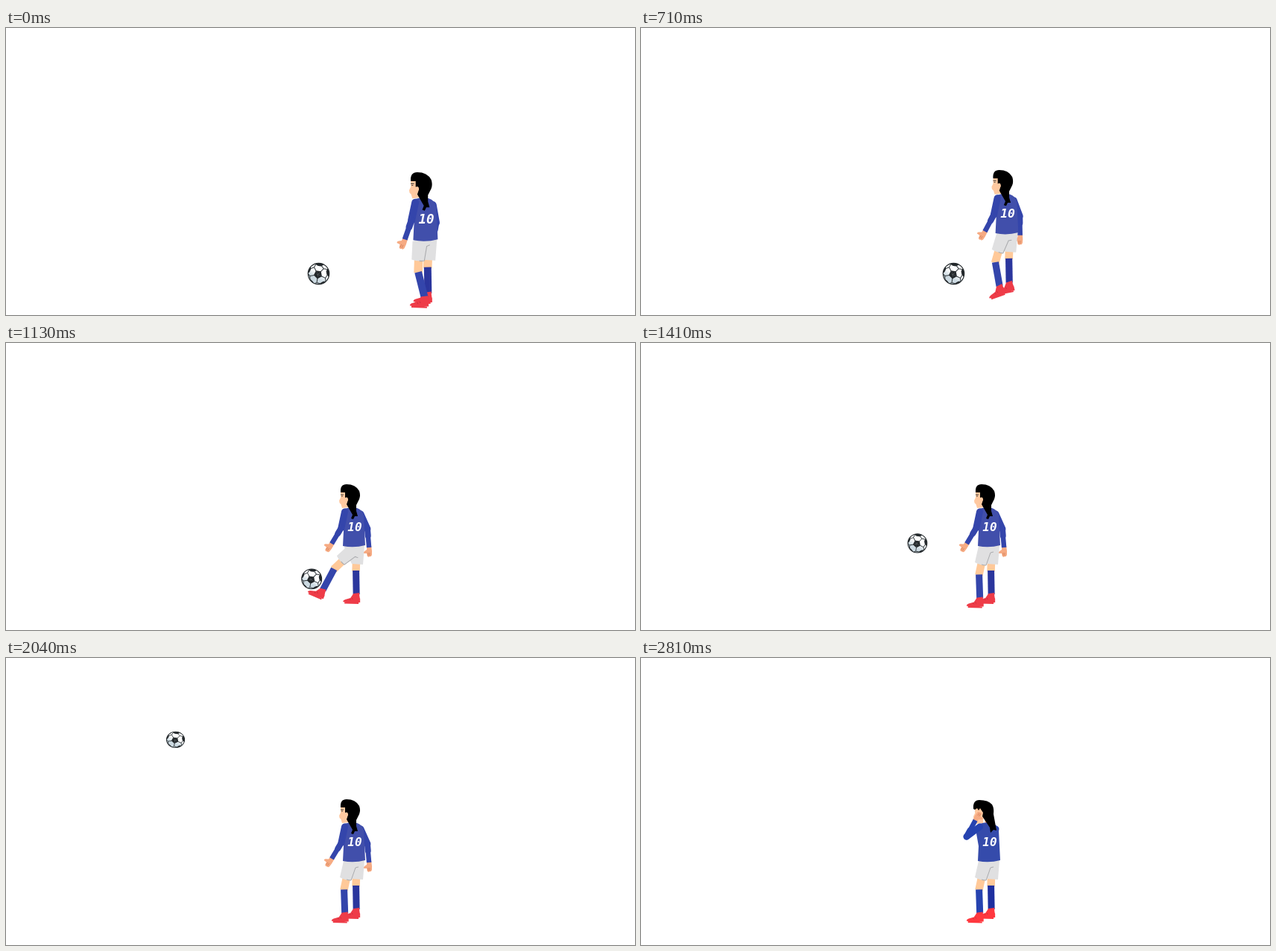
Recreate the animation shown at these times as an HTML page with a canvas. Size 844 by 386 pixels, loop 2.88 s.

```html
<!DOCTYPE html>
<html lang="en">
<head>
<meta charset="utf-8">
<title>Penalty kick</title>
<style>
html, body { margin: 0; width: 100%; height: 100%; overflow: hidden; background: #fff; }
canvas { display: block; }
</style>
</head>
<body>
<canvas id="stage" width="844" height="386"></canvas>
<script>
const ctx = document.getElementById('stage').getContext('2d');
const LOOP = 2880, HOLD = 500, STEP = 70;
const KICK = 8, PEAK = 24, GONE = 32; // in steps

const rad = deg => deg * Math.PI / 180;
const ramp = (n, from, to) => Math.min(1, Math.max(0, (n - from) / (to - from)));

function shape(d, fill, line, width = 1) {
  const p = new Path2D(d);
  if (fill) { ctx.fillStyle = fill; ctx.fill(p); }
  if (line) { ctx.strokeStyle = line; ctx.lineWidth = width; ctx.stroke(p); }
}

function at(x, y, deg, draw) {
  ctx.save();
  ctx.translate(x, y);
  ctx.rotate(rad(deg));
  draw();
  ctx.restore();
}

// End of a limb part; angles run from straight down towards the left
const reach = ([x, y], deg, len) => [x - Math.sin(rad(deg)) * len, y + Math.cos(rad(deg)) * len];

function bar(a, b, width, color, cap = 'butt') {
  ctx.lineCap = cap;
  ctx.lineWidth = width;
  ctx.strokeStyle = color;
  ctx.beginPath();
  ctx.moveTo(...a);
  ctx.lineTo(...b);
  ctx.stroke();
}

function arm(shoulder, upper, fore, color) {
  const elbow = reach(shoulder, upper, 22), wrist = reach(elbow, fore, 25);
  at(...wrist, fore + 6, () => {
    shape('M-3-2H3L4 5 4 10Q3 13 1 12L0 13-2 12-3 8-7 8Q-8 6-6 5L-3 3Z', '#f6ab83');
    shape('M1 7V11M-1 7V11', null, '#c9744f', .6);
  });
  bar(shoulder, elbow, 9, color, 'round');
  bar(elbow, wrist, 6.5, color);
  bar(elbow, reach(elbow, fore, 9), 8, color, 'round');
}

function leg(hip, thigh, shin, foot, sock, shoe) {
  const knee = reach(hip, thigh, 26), ankle = reach(knee, shin, 32);
  bar(hip, reach(knee, thigh, 1), 10.5, '#ffc999');
  bar(knee, ankle, 9, sock);
  at(...ankle, foot, () => {
    shape('M-4-1 4-2Q4 4 5 6V11H1L-3 12H-10L-18 10Q-18 8-15 7L-8 5Z', shoe);
    bar([3, 12], [-16, 11.5], 2, shoe); // studs
    shape('M-9 6-8 8M-6 5-5 7', null, '#c92a3c', .8);
  });
}

function head(bowed) {
  const face = 'M449 201 456 200 461 208 460 221 451 222 449.5 217 447.5 215 447 212 449 208Z';
  if (bowed) {
    at(-1, 1, 0, () => shape(face, '#ffc9a0'));
    shape('M446 203Q445 191 454 191 466 191 471 197 474 202 473 210L477 232 473 231 469 235 468 228 458 213 459 208 455 202 453 205 451 202 448 204Z', '#000');
  } else {
    shape(face, '#ffc9a0');
    shape('M449 204H453M450 206H452', null, '#333', .9);
    shape('M449 201Q448 190 457 190 469 190 474 199 476 205 474 210L470 218 470 226 472 233 468 233 466 237 463 236 465 231 457 217 459 211 455 208 455 201Z', '#000');
    shape('M455 208Q459 206 459 211L457 214 455 213Z', '#ffc9a0');
  }
}

function player(n) {
  const late = n >= PEAK;
  const sleeve = late ? '#2643b0' : '#3445ab';
  const torso = late ? '#354bab' : '#414fab';
  const shoe = late ? '#ff383f' : '#ee3c48';

  const walk = 1 - (1 - ramp(n, 0, KICK)) ** 2;
  const stride = Math.sin(Math.PI * ramp(n, 0, KICK));
  const kick = ramp(n, KICK, 10) * (1 - ramp(n, 10, 14));
  const settle = ramp(n, KICK, 14);
  const raise = ramp(n, PEAK, 28);
  const cover = ramp(n, 28, GONE);

  const thigh = 2 + 10 * settle + 14 * stride + 41 * kick;
  const shin = -14 + 12 * settle + 4 * stride + 38 * kick;
  const scale = 1.1 - .1 * walk;

  ctx.save();
  ctx.translate(564 - 96 * walk, 194 - 4 * walk);
  ctx.scale(scale, scale);
  ctx.translate(-468, -190);

  arm([476, 230],
    -10 - 14 * walk + 19 * raise + 20 * cover,
    10 - 15 * walk + 117 * raise + 58 * cover, sleeve);
  leg([470.5, 280], 2, -1, -12 * stride, late ? '#1e2f9f' : '#2b369d', shoe);
  leg([459, 286], thigh, shin, 22 * kick - 21 * stride, sleeve, shoe);

  shape('M453 272H481L479 298 464 297 458 285Z', '#e0e0e1');
  at(460, 284, thigh - 12, () => {
    shape('M-7-11-12 11Q-5 15 3 15L10-3 6-11Z', '#e0e0e1');
    shape('M-3 14Q0 15 3 15L9-2 13-3', null, '#aaabae');
  });

  shape('M454 223Q462 220 471 222 478 224 480 232L482 272Q467 276 452 273L453 253 450 236Z', torso);
  ctx.fillStyle = '#fff';
  ctx.font = 'italic bold 16px "DejaVu Sans Mono", monospace';
  ctx.textAlign = 'center';
  ctx.fillText('10', 468, 252.7);
  head(n > GONE);
  arm([454.5, 227],
    12 + 23 * raise + 18 * cover,
    19 + 12 * walk + 77 * raise + 100 * cover, sleeve);
  ctx.restore();
}

function ball(n) {
  if (n >= GONE) return;
  const q = ramp(n, KICK, PEAK), fall = Math.max(0, n - PEAK);
  const x = 419.5 - 211.5 * q ** 1.5 - 19.2 * fall - .89 * fall ** 2;
  const y = 330.5 - 241.5 * q ** 1.4 + 4 * fall + 2.1 * fall ** 2;
  const r = 14.8 - 2.3 * Math.sqrt(q);

  ctx.save();
  ctx.translate(x, y);
  ctx.scale(r, r - 1.6 * q * q);
  const disc = new Path2D();
  disc.arc(0, 0, .96, 0, 7);
  const shade = ctx.createLinearGradient(.4, -.7, -.4, .8);
  shade.addColorStop(.4, '#fff');
  shade.addColorStop(.75, '#cbd9e1');
  ctx.fillStyle = shade;
  ctx.fill(disc);
  ctx.save();
  ctx.clip(disc);
  for (let i = 0; i < 5; i++) {
    at(-.06, .07, i * 72 + 8, () => {
      shape('M0 0 .25-.32-.25-.32ZM-.36-.9-.14-.78.14-.78.36-.9.3-1.3H-.3Z', '#23282b');
      shape('M.2-.28.44-.6M.44-.6.2-.82M.44-.6.74-.58', null, '#333a3e', .07);
    });
  }
  ctx.restore();
  ctx.strokeStyle = '#23282b';
  ctx.lineWidth = .08;
  ctx.stroke(disc);
  ctx.restore();
}

function frame(now) {
  const t = now % LOOP;
  const n = t < HOLD ? 0 : Math.floor((t - HOLD) / STEP) + 1;
  ctx.fillStyle = '#fff';
  ctx.fillRect(0, 0, 844, 386);
  player(n);
  ball(n);
  requestAnimationFrame(frame);
}
frame(0);
</script>
</body>
</html>
```
